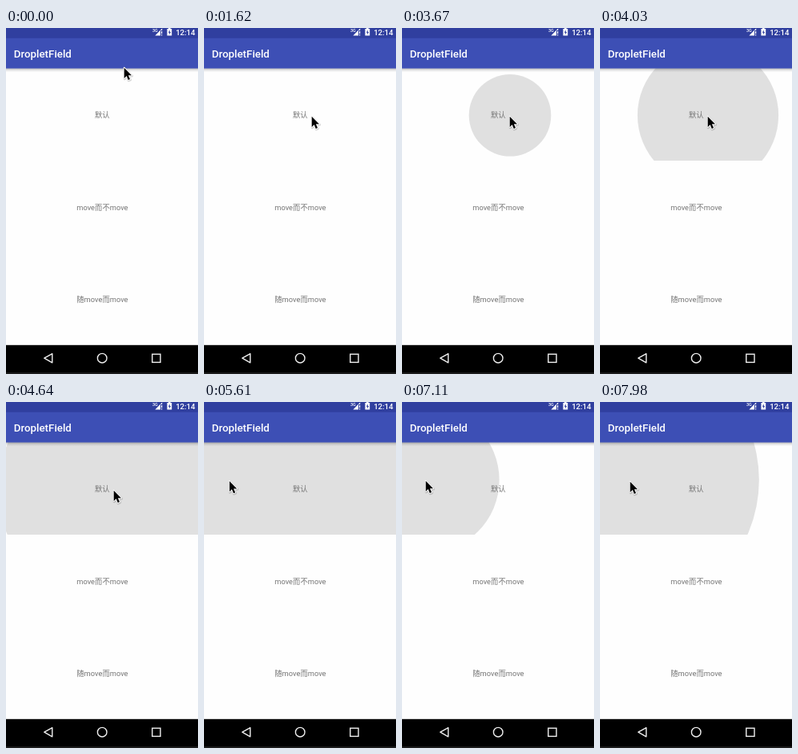
An HTML page for the animation above (8 s loop, 240x433 px).

```html
<!DOCTYPE html>
<html lang="zh">
<head>
<meta charset="utf-8">
<title>Ripple demo</title>
<style>
  html, body { margin: 0; width: 100%; height: 100%; overflow: hidden; background: #fefefe; }
  svg { display: block; width: 100vw; height: 100vh; }
  text { font-family: Roboto, "Noto Sans CJK SC", "Noto Sans CJK", sans-serif; }
  .bold { font-weight: 500; fill: #fff; }
  .label { font-size: 9.33px; fill: #757575; text-anchor: middle; }
  .nav { fill: none; stroke: #f0f0f0; stroke-width: 1.4; }
</style>
</head>
<body>
<svg viewBox="0 0 240 433">
  <defs>
    <clipPath id="panel"><rect y="50" width="240" height="116"/></clipPath>
    <linearGradient id="shade" x2="0" y2="1">
      <stop offset="0" stop-opacity=".32"/>
      <stop offset=".4" stop-opacity=".12"/>
      <stop offset="1" stop-opacity="0"/>
    </linearGradient>
    <path id="arrow" d="M1.2 1.2V14.4L4.2 11.6L6.3 16.4L8.5 15.5L6.4 10.7H10.5Z" stroke-linejoin="round"/>
  </defs>
  <rect width="240" height="433" fill="#fefefe"/>
  <g clip-path="url(#panel)"><circle id="ripple" fill="#e0e0e0"/></g>

  <text class="label" x="120.3" y="111.8">默认</text>
  <text class="label" x="120.4" y="227.6">move而不move</text>
  <text class="label" x="120.4" y="343">随move而move</text>

  <rect y="50.4" width="240" height="4.8" fill="url(#shade)"/>
  <rect width="240" height="50.6" fill="#3d4fb5"/>
  <rect width="240" height="12.7" fill="#303f9f"/>
  <text class="bold" x="9.8" y="36.8" font-size="13.33">DropletField</text>

  <text class="bold" x="183" y="4.6" font-size="5.4">3G</text>
  <path d="M195.2 .6V3H193V9.4H186.4Z" fill="#fff"/>
  <path d="M194 4h1.2v3.2H194zM194 8.2h1.2v1.2H194z" fill="#fff"/>
  <path d="M203 0h2.6v1h1.6v8.6h-5.8V1H203Z" fill="#fff"/>
  <path d="M204.8 2.4l-2 3.3h1.3v2.5l2-3.3h-1.3Z" fill="#303f9f"/>
  <text class="bold" x="236.5" y="8.8" font-size="9.6" text-anchor="end">12:14</text>

  <rect y="396.8" width="240" height="36.2"/>
  <rect y="431" width="240" height="2" fill="#1c1c1c"/>
  <path class="nav" d="M57.8 407.6V418.8L47.8 413.2Z" stroke-linejoin="round"/>
  <circle class="nav" cx="120.2" cy="413.2" r="5.8"/>
  <rect class="nav" x="182.8" y="408.2" width="10.2" height="10.2"/>

  <g id="cursor">
    <use href="#arrow" x=".5" y=".9" fill="none" stroke="#000" stroke-opacity=".16" stroke-width="3"/>
    <use href="#arrow" stroke="#fff" stroke-width="1.9" paint-order="stroke"/>
  </g>
</svg>
<script>
const LOOP = 8000;
const ripple = document.getElementById('ripple');
const cursor = document.getElementById('cursor');

const home = { x: 146.5, y: 48.5 };
const glides = [
  { from: 0, to: 3, x: 133, y: 117 },
  { from: 6, to: 18, x: 133.5, y: 109.5 },
  { from: 54, to: 64.5, x: 28.5, y: 97.5 },
  { from: 85, to: 90, x: 36.5, y: 98.5 }
];
const presses = [
  { x: 135, y: 109.3, down: 36, grow: 37, up: 64 },
  { x: 30, y: 97.6, down: 68, grow: 71.6, up: 91 }
];

const clamp01 = v => Math.min(1, Math.max(0, v));
const easeOut = k => 1 - (1 - k) ** 2;

// Ticks last 90 ms at first and shorten slightly as the loop goes on.
const tickAt = t => Math.floor(t / 90 + 1.333 * (t / LOOP) ** 2 + 0.1);

function cursorAt(tick) {
  return glides.reduce((p, g) => {
    const k = easeOut(clamp01((tick - g.from) / (g.to - g.from)));
    return { x: p.x + (g.x - p.x) * k, y: p.y + (g.y - p.y) * k };
  }, home);
}

// The ripple starts finger-sized, then spreads and gradually slows.
function radiusAt(press, tick) {
  const u = Math.max(0, tick - press.grow);
  return 11.3 + 10.4 * u - 0.1 * u * u;
}

function draw(t) {
  const tick = tickAt(t);
  const { x, y } = cursorAt(tick);
  cursor.setAttribute('transform', `translate(${x} ${y})`);
  const press = presses.find(p => tick >= p.down && tick < p.up);
  ripple.setAttribute('r', press ? radiusAt(press, tick) : 0);
  if (press) {
    ripple.setAttribute('cx', press.x);
    ripple.setAttribute('cy', press.y);
  }
}

let start;
function frame(now) {
  start ??= now;
  draw((now - start) % LOOP);
  requestAnimationFrame(frame);
}
draw(0);
requestAnimationFrame(frame);
</script>
</body>
</html>
```
